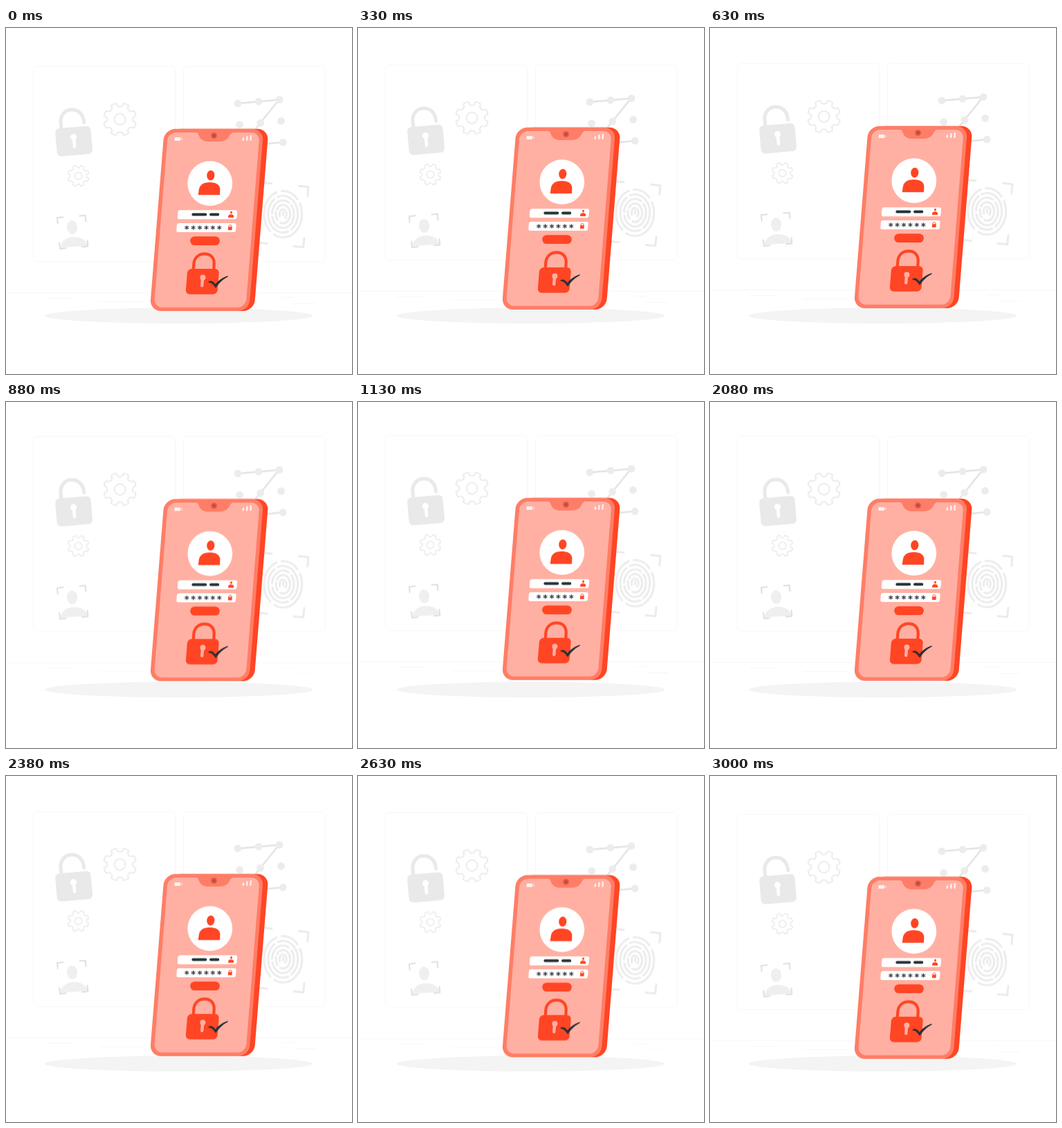
Recreate the animation shown at these times as an HTML page. Size 500 px wide and 500 px high, loop 3040 ms.

```html
<!DOCTYPE html>
<html lang="en">
<head>
<meta charset="utf-8">
<title>Secure login</title>
<style>
  html, body { margin: 0; width: 100%; height: 100%; overflow: hidden; background: #fff; }
  svg { display: block; width: 100%; height: 100%; }
  .float { animation: float 3040ms linear infinite; }
  @keyframes float {
    0%, 100% { transform: translateY(0); }
    50% { transform: translateY(-9.7px); }
  }
  .line { fill: none; stroke-linecap: round; stroke-linejoin: round; }
  .red { fill: #ff4524; }
  .dark { stroke: #263238; }
</style>
</head>
<body>
<svg viewBox="0 0 500 500">
  <defs>
    <path id="star" class="line dark" stroke-width="1.2" d="M0 -2.6V2.6M-2.4 -1.3L2.4 1.3M-2.4 1.3L2.4 -1.3"/>
  </defs>

  <g class="float">
    <g class="line" stroke="#f7f7f7">
      <rect x="39.5" y="55.5" width="205" height="282" rx="5"/>
      <rect x="256.5" y="55.5" width="204.500" height="282" rx="5"/>
      <path d="M0 382.500H500M57 390.500H97M135 395.500H197M400 389.500H416M417 398.500H448"/>
    </g>

    <!-- padlock -->
    <path class="line" stroke="#e9e9e9" stroke-width="5" stroke-linecap="butt" d="M80 146L79 136.500C78.300 126 85 118.600 94 118.100C104 117.500 111.500 124 112.700 136.500"/>
    <rect x="72.300" y="143.300" width="51.500" height="40.500" rx="6" fill="#e9e9e9" transform="rotate(-5 98 163.500)"/>
    <circle cx="97.500" cy="157.700" r="4.600" fill="#fff"/>
    <path class="line" stroke="#fff" stroke-width="4.600" d="M98 159L99 171.500"/>

    <g id="gears" class="line" stroke="#ebebeb"></g>

    <!-- face scan -->
    <g fill="#efefef">
      <ellipse cx="95.600" cy="288" rx="7.600" ry="10" transform="rotate(-4 95.600 288)"/>
      <path d="M78.500 317.500C80 307 88 302.300 97 301.900C108 301.600 115.500 305.500 118 314.500Z"/>
    </g>
    <path class="line" stroke="#dfdfdf" stroke-width="2" stroke-linecap="butt" stroke-linejoin="miter"
      d="M82.500 273.300L74 274.200L74.700 282.500M106.500 271.600L114.800 270.900L115.500 279.500M117.600 307L118.300 315.500L110 316.200M77.200 310.500L78 319L86.300 318.200"/>

    <!-- unlock pattern -->
    <path class="line" stroke="#e3e3e3" stroke-width="2.500" d="M335 109L394.500 103.700L340 171L400 165"/>
    <g id="dots" fill="#ececec"></g>

    <!-- fingerprint -->
    <g id="print" class="line" stroke="#ededed" stroke-width="3.200"></g>
    <path class="line" stroke="#ebebeb" stroke-width="3" stroke-linecap="butt" stroke-linejoin="miter"
      d="M423.500 228.300L437 229.700L435.800 243M431 303.500L429.700 316.800L416 315.500M370 223.500L384 224.800M362 310L377 311.400"/>
  </g>

  <ellipse cx="249.500" cy="415.700" rx="194" ry="11.300" fill="#f4f4f4"/>

  <g class="float">
    <g transform="matrix(1 0 -.08 1 32.720 0)">
      <rect class="red" x="215.500" y="145.700" width="143" height="263.300" rx="16"/>
      <rect x="207.700" y="145.700" width="143.500" height="263.300" rx="16" fill="#ff7d66"/>
      <rect x="213.300" y="151" width="132.700" height="252.700" rx="12" fill="#ffb0a3"/>
    </g>

    <!-- notch and status bar -->
    <path fill="#ff7d66" d="M272 150.500C277 150.500 277.500 152 278.500 155C281 161.500 286 164 292 164H308C316 164 320.500 161 323.500 155C325 152 327 150.500 331 150.500Z"/>
    <circle cx="300.500" cy="155.600" r="4.600" fill="#e3604f"/>
    <circle cx="300.700" cy="155.600" r="2.500" fill="#b54f45"/>
    <g fill="#fff3f0">
      <path d="M244 158H252.200L251.800 163H243.200ZM253.300 159.300H254.800L254.500 161.700H253.100Z"/>
    </g>
    <path class="line" stroke="#fff0ed" stroke-width="2.500" d="M343 159.500L342.800 161.700M348.500 157.300L348.200 161.700M353.900 156L353.500 161.700"/>

    <!-- avatar -->
    <circle cx="294.800" cy="224.600" r="32.400" fill="#fff"/>
    <g id="user" class="red">
      <ellipse cx="295.800" cy="213" rx="5.600" ry="7.300" transform="rotate(5 295.800 213)"/>
      <path d="M277.800 241.300L278.700 234C279.700 227 285 223.100 294.500 223.100C304 223.100 309.300 227 309.400 233.500L309 241.300Z"/>
    </g>

    <!-- fields -->
    <g fill="#fff" transform="matrix(1 0 -.08 1 32.720 0)">
      <rect x="237" y="263.200" width="85.700" height="13" rx="3"/>
      <rect x="237" y="282" width="85.700" height="13" rx="3"/>
    </g>
    <path class="line dark" stroke-width="3.900" d="M270.300 269.500H288.300M296 269.500H306.300"/>
    <use href="#user" transform="translate(325.200 269.300) scale(.255) translate(-294.500 -223.300)"/>
    <g id="stars"></g>
    <path class="red" d="M321.300 287.300H326.800L326.500 292H320.800Z"/>
    <path class="line" stroke="#ff4524" stroke-width=".9" d="M322 287.500V286.300A2.100 2.200 0 0 1 326.100 286.300V287.500"/>
    <rect class="red" x="266.200" y="301.200" width="42.700" height="12.800" rx="6.400"/>

    <!-- lock -->
    <path class="line" stroke="#ff4524" stroke-width="4.200" d="M270.800 350L271.400 340.500C272.200 332 278.500 326.400 287 326.400C295.500 326.400 301 332 300.700 340.500L300.200 350"/>
    <rect class="red" x="256.900" y="348" width="45.800" height="36.800" rx="6" transform="matrix(1 0 -.08 1 33.300 0)"/>
    <circle cx="284.400" cy="360.400" r="4" fill="#ffb0a3"/>
    <path class="line" stroke="#ffb0a3" stroke-width="4.400" d="M284.100 362L283.200 372.200"/>
    <path fill="#263238" d="M293 366.200C296.500 364.500 300 366.500 302.500 370.300C307 364.500 313 360.500 320 358.200C321 358 321.300 359.200 320.300 359.700C313 363.500 308 368.500 303 375.800C300 371.500 297.500 368.300 293.300 367.800C292.200 367.600 292.200 366.600 293 366.200Z"/>
  </g>
</svg>
<script>
  const add = (id, tag, attrs) => {
    const el = document.createElementNS('http://www.w3.org/2000/svg', tag);
    for (const k in attrs) el.setAttribute(k, attrs[k]);
    document.getElementById(id).append(el);
  };

  const gear = (cx, cy, r, hub, width) => {
    const at = (rad, deg) => {
      const a = deg * Math.PI / 180;
      return (cx + rad * Math.cos(a)).toFixed(2) + ' ' + (cy + rad * Math.sin(a)).toFixed(2);
    };
    const root = r * 0.8;
    let d = '';
    for (let i = 0; i < 8; i++) {
      const a = i * 45 + 22.5;
      d += (i ? 'L' : 'M') + at(root, a - 14) + 'L' + at(r, a - 9) +
        `A${r} ${r} 0 0 1 ` + at(r, a + 9) + 'L' + at(root, a + 14) +
        'Q' + at(root * 0.92, a + 22.5) + ' ' + at(root, a + 31);
    }
    add('gears', 'path', { d: d + 'Z', 'stroke-width': width });
    add('gears', 'circle', { cx, cy, r: hub, 'stroke-width': width });
  };
  gear(164.6, 132, 23.8, 8, 1.9);
  gear(104.5, 213.7, 15.3, 5.2, 1.5);

  for (let row = 0; row < 3; row++)
    for (let col = 0; col < 3; col++)
      add('dots', 'circle', { cx: 335 + col * 30 + row * 2.6, cy: 109 - col * 2.7 + row * 30.8, r: 5.4 });

  // ridges: radii, dash pattern and offset as percentages of the loop
  [[27.5, 33.5, '40 4 34 4 14 4', 8], [21.5, 26.5, '46 4 46 4', 30], [15.8, 20, '58 5 32 5', 12],
   [10.3, 13.3, '70 8 16 6', 40], [5, 7, '72 28', 58]].forEach(([rx, ry, dash, offset]) =>
    add('print', 'ellipse', { cx: 400.3, cy: 269, rx, ry, pathLength: 100,
      'stroke-dasharray': dash, 'stroke-dashoffset': offset }));
  add('print', 'path', { d: 'M400.5 266V270.5' });

  for (let i = 0; i < 6; i++)
    add('stars', 'use', { href: '#star', x: 261.2 + i * 9.42, y: 288.5 });
</script>
</body>
</html>
```
